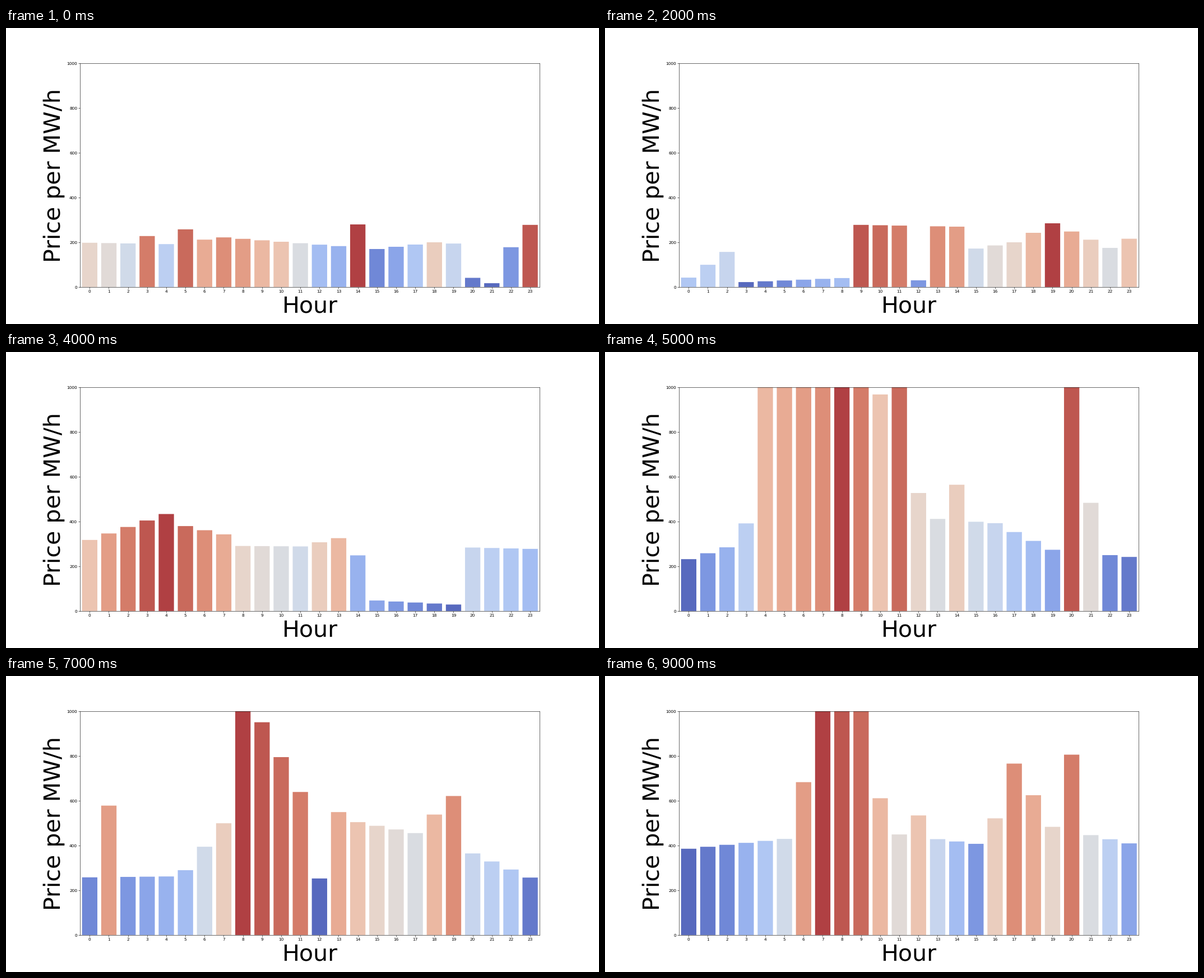
A matplotlib script for the animation above (10000 ms loop, 1058 by 529 pixels).

```python
import colorsys

import matplotlib.pyplot as plt
import numpy as np
from matplotlib.animation import FuncAnimation

HOURS = np.arange(24)
Y_MAX = 1000


def day(curve, spikes):
    """Hourly prices along straight lines between key hours, plus lone spikes."""
    prices = np.interp(HOURS, list(curve), list(curve.values()))
    for hour, price in spikes.items():
        prices[hour] = price
    return prices


def between(a, b):
    return (a + b) / 2


# Prices above Y_MAX run off the top of the chart.
calm = day({0: 198, 4: 192, 7: 222, 15: 170, 18: 200, 22: 178},
           {3: 228, 5: 258, 14: 280, 20: 41, 21: 17, 23: 278})
late = day({0: 42, 2: 157, 3: 22, 8: 40, 9: 278, 14: 270, 15: 172, 17: 200,
            19: 285, 22: 175, 23: 216}, {12: 30})
early = day({0: 318, 4: 434, 5: 380, 7: 343, 8: 291, 11: 289, 13: 326,
             14: 249, 15: 47, 19: 29, 20: 284, 23: 278}, {})
spike = day({0: 232, 2: 285, 3: 392, 4: 1050, 11: 1300, 12: 528, 13: 412,
             16: 393, 19: 274, 23: 242},
            {8: 1400, 10: 969, 14: 565, 20: 1350, 21: 484})
morning = day({0: 258, 4: 262, 5: 290, 7: 500, 8: 1108, 11: 640, 14: 505,
               17: 456, 19: 622, 20: 365, 23: 257}, {1: 579, 12: 253})
high = day({0: 505, 3: 623, 4: 868, 5: 1200, 8: 975, 10: 910, 15: 830,
            17: 508, 22: 478, 23: 936}, {1: 958, 11: 807})
peaks = day({0: 386, 5: 430, 6: 684, 7: 1100, 9: 1050, 10: 612, 11: 450,
             15: 408, 16: 522, 17: 767, 19: 484, 23: 410},
            {12: 535, 20: 807})

days = [calm, between(calm, late), late, between(late, early), early,
        spike, between(spike, morning), morning, high, peaks]


def muted(color, keep=0.75):
    h, l, s = colorsys.rgb_to_hls(*color[:3])
    return colorsys.hls_to_rgb(h, l, s * keep)


# One colour per rank, from the cheapest hour to the dearest.
coolwarm = plt.get_cmap("coolwarm")
palette = [muted(coolwarm(t)) for t in np.linspace(0, 1, len(HOURS) + 2)[1:-1]]

plt.rcParams.update({"font.family": "DejaVu Sans", "text.hinting": "none"})
fig, ax = plt.subplots(figsize=(20, 10), dpi=52.9, facecolor="white")
fig.subplots_adjust(left=0.125, right=0.9, bottom=0.125, top=0.88)
bars = ax.bar(HOURS, np.zeros(len(HOURS)), width=0.8, linewidth=0, snap=False)
ax.set_xlim(-0.5, len(HOURS) - 0.5)
ax.set_ylim(0, Y_MAX)
ax.set_xticks(HOURS)
ax.set_yticks(range(0, Y_MAX + 1, 200))
ax.tick_params(labelsize=10)
ax.set_xlabel("Hour", fontsize=56)
ax.set_ylabel("Price per MW/h", fontsize=56)


def draw(index):
    prices = days[index]
    ranks = prices.argsort(kind="stable").argsort()
    for bar, price, rank in zip(bars, prices, ranks):
        bar.set_height(price)
        bar.set_facecolor(palette[rank])
    return list(bars)


anim = FuncAnimation(fig, draw, frames=len(days), init_func=lambda: draw(0),
                     interval=1000, repeat=True, repeat_delay=0)
plt.show()
```
